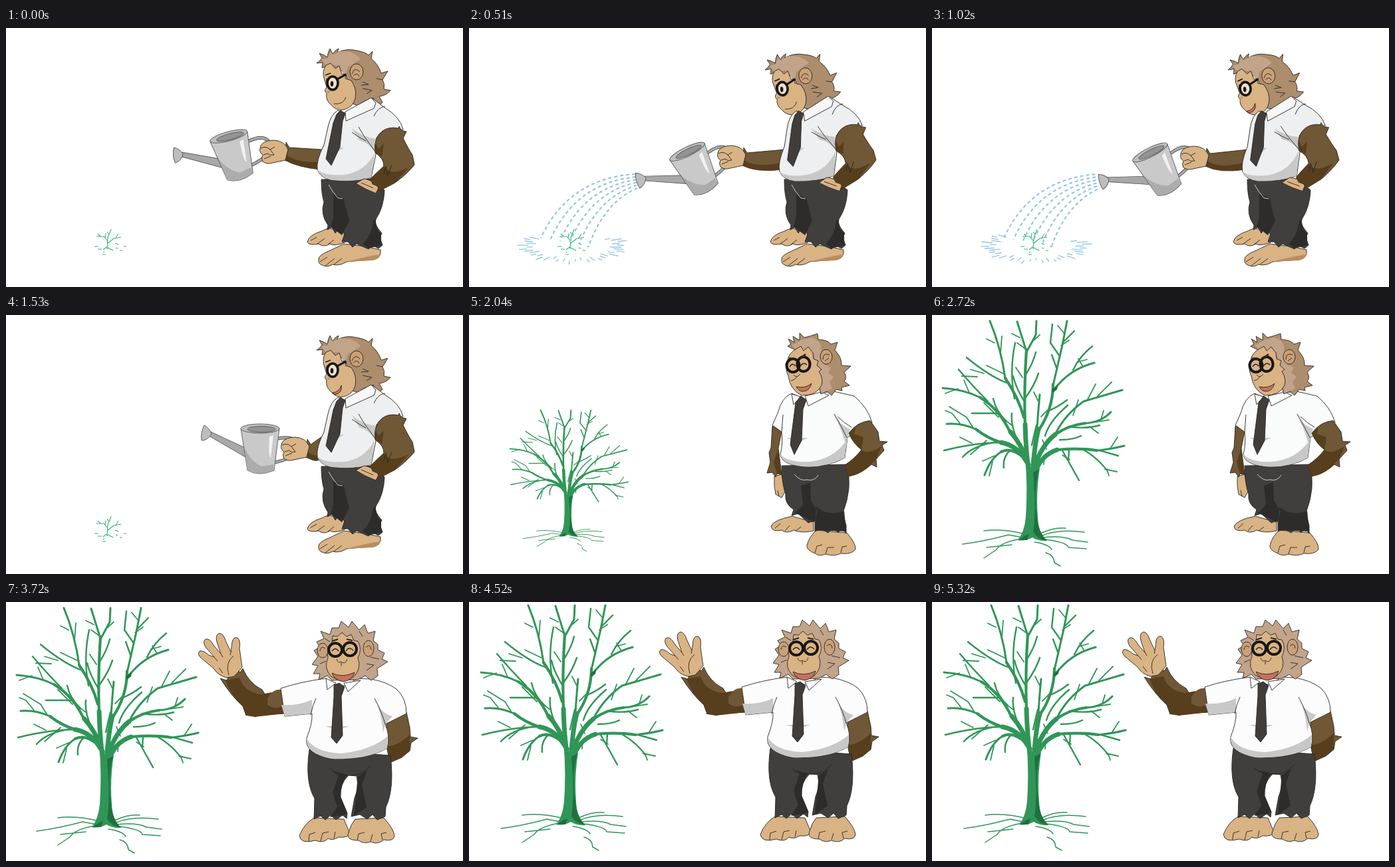
These frames come from a looping animation (687 px wide and 390 px high, 7120 ms). An HTML page:

```html
<!DOCTYPE html>
<html lang="en">
<head>
<meta charset="utf-8">
<title>Watering a tree</title>
<style>
html, body { margin: 0; width: 100%; height: 100%; overflow: hidden; background: #fff; }
svg { display: block; width: 100vw; height: 100vh; }
</style>
</head>
<body>
<svg id="stage" viewBox="0 0 687 390" preserveAspectRatio="none"></svg>
<script>
const LOOP = 7120;
const C = {
  ink: '#2a2623', skin: '#d9b384', skinDark: '#b98d5f', hair: '#ad8d6c', hairLight: '#c2a48a',
  fur: '#705735', furDark: '#573e1d', shade: '#c8c8c8', tie: '#403d3a', cloth: '#413f3d',
  clothDark: '#2e2c2b', lip: '#c8705c', tree: '#309657', treeDark: '#1f7040', water: '#93c6e4'
};

const fill = (d, color, more = '') => `<path d="${d}" fill="${color}" ${more}/>`;
const tone = (d, color) => fill(d, color, 'stroke="none"');
const line = (d, w = .9, color = C.ink) =>
  `<path d="${d}" fill="none" stroke="${color}" stroke-width="${w}"/>`;
const group = (body, transform = '', more = '') =>
  `<g ${transform && `transform="${transform}"`} ${more}>${body}</g>`;
const oval = (x, y, rx, ry, color, more = '') =>
  `<ellipse cx="${x}" cy="${y}" rx="${rx}" ry="${ry}" fill="${color}" ${more}/>`;
const lens = (x, y, rx, ry = rx, w = 4) =>
  oval(x, y, rx, ry, 'none', `stroke="#171614" stroke-width="${w}"`);

/* ---------- tree ---------- */
const BOUGHS = [
  [7, 'M146 240Q141 205 140 165M151 240Q154 195 160 172M145 225Q135 195 118 176M143 222Q128 196 104 192M154 240Q163 211 188 203M154 228Q165 196 185 180'],
  [4.2, 'M140 170Q138 110 142 52M160 174Q182 142 182 104M118 178Q102 142 72 124M138 154Q130 124 110 95M104 192Q84 186 66 172M188 203Q222 200 248 204M185 180Q205 166 230 163M142 218Q120 198 104 206'],
  [3, 'M142 55L128 10M142 56L156 30L157 9M182 106L196 45L203 9M72 124Q48 112 16 110M110 95Q104 50 87 9M66 172Q44 162 22 164M248 204Q270 202 289 197M230 163Q254 162 269 146M104 206Q88 216 79 241M184 112Q206 82 244 72M158 170Q160 140 162 120M186 178Q200 150 228 130L286 113'],
  [2.4, 'M104 192Q66 192 18 204M98 191Q62 196 46 214M118 203Q106 214 108 230M112 160Q96 145 92 126M128 188Q118 165 120 148M100 148Q84 148 60 148M84 130Q62 108 40 82M112 102Q86 92 52 64M124 126Q116 84 125 42M140 132Q126 110 122 92M141 124Q154 106 160 88M142 88Q152 72 156 56M192 62L178 42L181 14M188 82L180 60M212 83Q222 62 241 47M196 42L214 24M176 144Q190 138 203 128M170 182Q176 160 204 136M205 168Q232 172 252 166M192 188Q212 188 224 182M196 204Q205 220 221 249M206 203L205 218M226 202Q248 214 263 234M252 204L280 212M150 196Q154 178 157 166'],
  [1.8, 'M103 58L105 32M94 42L82 36M109 89L82 76M56 117L48 98M39 111L20 118M68 93L45 92M78 88L58 82M42 163L30 148L20 144M62 170L52 154L26 138M60 193L42 184M82 189L58 210M94 212L76 220M132 34L120 28M142 52L128 42M153 38L162 30M199 28L189 16M194 46L206 38M226 76L220 66M218 71L233 67M234 127L246 104M249 122L270 101M212 151L220 128M246 161L266 158M254 157L258 144M268 201L279 184M260 232L278 236M263 233L266 242M237 168L250 178M207 218L196 211M172 202L166 188M169 211L168 225M100 154L78 132M120 166L104 154M136 94L126 79M160 130L153 116M164 153L178 139M91 221L86 242'],
  [1.5, 'M140 330Q106 321 78 325M136 335L115 331Q78 341 46 345M140 336Q104 341 96 354L78 366M120 346L82 350M163 329Q184 319 201 321M166 332Q190 322 229 327M166 335Q198 332 211 339L234 342M170 338Q203 342 205 350L232 352M154 342Q175 345 180 353M171 358Q183 361 184 373L193 378']
];
const TREE = BOUGHS.map(([w, d]) => line(d, w, C.tree)).join('') +
  tone('M140 208Q144 260 141 304Q139 327 129 339Q140 341 151 335Q160 341 173 340Q160 329 159 304Q156 269 162 230L151 237Z', C.tree) +
  tone('M152 237L161 232Q152 263 158 305Q159 326 173 340Q158 338 152 326Q157 300 152 237M130 339Q140 331 146 330L143 339ZM180 112L189 105L188 112L182 117Z', C.treeDark);

const tree = (sx, sy, x = 152, y = 337) =>
  group(TREE, `translate(${x} ${y}) scale(${sx} ${sy}) translate(-152 -337)`, 'stroke-linecap="round"');
const SPROUT = line('M152 333L153 316L158 303M153 321L147 314L136 314M142 314L138 310M149 317L150 309M153 324L162 317L173 315M165 316L169 310M155 311L152 307M146 334L151 330L161 335M133 329H139M138 333H144M145 341H150M148 337L146 338M164 324L169 326M171 335H175M177 329H181M165 331L168 332', 1.1, '#32b572');

/* ---------- watering can ---------- */
function can([x, y, a]) {
  const handle = 'M27 -17Q52 -22 57 -7Q56 13 21 19';
  return group(
    line(handle, 5, '#555') + line(handle, 3, '#aaa') +
    fill('M-18 -1L-74 -27L-77 -21L-22 11Z', '#a8a8a8') +
    fill('M-84 -37Q-90 -25 -88 -14Q-79 -14 -73 -24Q-76 -33 -84 -37Z', '#bdbdbd') +
    fill('M-29 -32L-19 31Q-2 41 21 31L29 -32Z', '#c9c9c9') +
    tone('M-24 -5Q-16 16 2 25L20 22L20 31Q-2 40 -19 31Z', '#acacac') +
    tone('M14 -20L20 -22L16 12Q12 10 14 -20', '#f2f2f2') +
    oval(0, -32, 29, 7, '#bdbdbd') + oval(2, -31, 21, 4.5, '#949494'),
    `translate(${x} ${y}) rotate(${a})`, 'stroke="#5a5a5a"');
}

/* ---------- water ---------- */
const mix = (a, b, k) => a + (b - a) * k;
function water(phase, full) {
  let jets = '', ring = '';
  for (let i = 0; i < 6; i++) {
    const k = i / 5;
    jets += `M${mix(250, 253, k)} ${mix(220, 241, k)}Q${mix(150, 204, k)} ${mix(226, 262, k)} ${mix(108, 180, k)} ${mix(316, 328, k)}`;
  }
  for (let i = 0; i < 34; i++) {
    const a = -.55 + i / 33 * 4.25 + phase * .06;
    const r = .72 + (i * 7 % 5) * .045, end = r + .13 + (i * 3 % 4) * .03;
    const at = s => `${156 + 78 * s * Math.cos(a)} ${328 + 25 * s * Math.sin(a)}`;
    ring += `M${at(r)}L${at(end)}`;
  }
  const dashes = `<path d="${jets}" fill="none" stroke="${C.water}" stroke-width="2.2" stroke-dasharray="5 4" stroke-dashoffset="${-phase * 4.5}"/>`;
  return full ? dashes + line(ring, 1.4, C.water)
    : `<clipPath id="start"><path d="M185 200H270V290H185Z"/></clipPath>` + group(dashes, '', 'clip-path="url(#start)"');
}

/* ---------- side view ---------- */
const sideLegs =
  fill('M453 322Q455 312 474 306L485 301L509 308L509 323Q494 329 487 325Q478 331 470 325Q455 328 453 322Z', C.skin) +
  line('M458 320L467 315M468 325L479 317M484 326L493 319') +
  fill('M470 348Q470 342 485 336L508 325L540 329L563 334Q565 346 552 349Q530 350 512 352Q501 359 491 356Q483 361 475 357Q469 355 470 348Z', C.skin) +
  tone('M512 352Q540 344 563 341Q561 349 550 350Z', C.skinDark) +
  line('M472 352L483 345M480 358L494 347M493 356L505 347') +
  fill('M474 228Q474 250 478 262Q472 280 484 297L483 304L490 300L495 309L499 303L509 310L505 322L514 322L521 330L527 325L545 333L550 327L560 332L566 327L562 315L565 309Q553 296 556 288Q568 270 569 244L548 227Z', C.cloth) +
  tone('M492 250L492 285L488 299L505 312L516 290L507 256ZM536 325Q550 312 552 290L556 288Q554 300 564 310L564 327L545 332Z', C.clothDark) +
  line('M485 236L491 246L499 256L506 257', .9, '#ddd');

const sideHead = open =>
  fill('M481 58L475 60L476 52L467 53Q473 49 475 45L471 38Q480 41 483 44Q484 36 487 31L491 39Q495 33 500 31L498 37Q512 30 527 34Q540 36 545 41L551 35L549 46Q560 55 564 68L574 65L566 78Q570 84 568 92L578 94Q571 102 561 103L566 112L559 118Q555 114 552 105L549 109Q540 106 530 117L521 114L510 66Z', C.hair) +
  tone('M482 57L477 52L474 47L483 46L488 36L492 40L502 35Q524 34 533 47L514 59L509 74L501 57L488 55Z', C.hairLight) +
  fill('M481 56Q474 66 479 79L482 89Q477 95 482 98Q480 108 488 115Q496 125 508 123Q522 119 525 106Q528 92 519 79L510 76L511 69L505 70L501 57L495 61L488 53Z', C.skin) +
  oval(527, 66, 10, 12, '#c9a078') + line('M520 69Q524 58 532 66M522 72Q528 66 531 73') +
  line('M536 81L545 85L534 86M536 91L550 94L542 99M557 76L566 78') +
  oval(491, 83, 8, 10, '#eee0cf', 'stroke="#171614" stroke-width="3.6"') +
  oval(490, 84, 2.3, 4, '#171614', 'stroke="none"') +
  line('M498 77L511 70', 3, '#171614') + line('M483 76Q481 82 484 89', 2, '#171614') +
  line('M480 71L488 68', 1.8) +
  (open ? fill('M491 117Q501 116 504 106Q506 118 494 120Z', C.lip) : line('M493 114Q507 116 511 104')) +
  tone('M481 95Q484 96 488 94L485 98Z', C.skinDark);

const sideTorso =
  fill('M499 124Q488 130 484 149L478 176Q466 200 468 213Q472 226 490 229Q525 233 549 225L556 190L557 165Q575 148 597 153Q593 134 568 119L551 106Q530 118 510 128Z', '#eeeff0') +
  tone('M468 213Q478 223 508 221Q540 217 554 188L549 225Q525 232 490 229Q472 225 468 213M520 151Q535 164 556 167L555 188Q546 173 531 169M484 181L508 180L498 187Z', C.shade) +
  line('M530 149L539 164L555 186M520 157Q531 165 541 170M553 133Q559 119 570 118') +
  fill('M497 130L503 124L510 129L506 140L502 179L489 207L481 197L492 143Z', C.tie) +
  fill('M510 126L511 140L553 121L556 113L549 105Z', '#f7f7f7') +
  fill('M526 234L538 227Q549 228 561 239L556 249Q540 243 526 234Z', C.skin) + line('M534 233L552 241') +
  fill('M555 188Q552 165 566 155Q576 148 590 151L591 148L594 154L602 156L597 166Q606 184 611 191L614 206Q603 220 585 233L562 245L558 238L551 235L548 227Q557 218 568 208Q568 196 555 188Z', C.fur) +
  tone('M548 227Q557 218 568 208Q576 224 605 210L585 233L562 245L558 238L551 235ZM555 188L555 172L560 182L568 174L565 194Z', C.furDark) +
  line('M568 220L571 208L574 222L580 206');

const sideArm = ([x, y]) =>
  fill(`M482 170L475 183L${x + 24} ${y - 7}L${x + 19} ${y - 15}L${x + 17} ${y + 12}Q${x + 38} ${y + 23} 472 213Z`, C.fur) +
  tone(`M${x + 18} ${y + 3}Q${x + 38} ${y + 18} 474 201L472 213Q${x + 38} ${y + 23} ${x + 17} ${y + 12}Z`, C.furDark);

const fist = ([x, y]) => group(
  fill('M22 -4Q17 -17 1 -18Q-14 -18 -19 -10Q-23 0 -16 4Q-19 9 -16 14Q-10 19 -1 16L18 12Z', C.skin) +
  line('M-19 -6Q-12 -10 -5 -4L1 4Q-5 6 -9 2L-15 4M-14 10L-4 6M-5 -4L2 -8'),
  `translate(${x} ${y})`);

function side({ hand, pot, lean = 0, open = false, phase = -1, full = true }) {
  return (phase < 0 ? '' : water(phase, full)) + sideArm(hand) + can(pot) + fist(hand) + sideLegs +
    group(group(sideHead(open), `translate(${-10 * lean} ${6 * lean})`) + sideTorso, `rotate(${-4 * lean} 510 232)`);
}

/* ---------- three-quarter view ---------- */
const turnHead =
  fill('M489 52L479 47L484 44L480 36L489 41L487 32L497 38L497 27L504 34Q513 32 524 28L525 37Q539 37 544 44L554 41L550 53Q561 64 560 76L574 77L564 86Q569 94 564 100L572 106L560 109L561 114L552 112L545 121L538 115L529 119L510 55Z', C.hair) +
  tone('M490 51L485 45L491 43L498 38L514 34Q532 38 529 56L533 74L544 79L540 87L548 93L542 101L546 111L539 114L530 118L518 57Z', C.hairLight) +
  fill('M492 51Q478 59 479 72Q475 82 480 92Q483 113 500 121Q522 122 530 106Q533 96 526 85L530 82L523 76L525 69L518 66L517 57L510 48L503 54L499 47Z', C.skin) +
  oval(537, 63, 9, 11, '#c9a078') + line('M532 67Q532 56 542 60M535 69L541 65') +
  lens(487, 76, 9.5, 10) + lens(503, 74, 9.5, 11) +
  line('M482 78Q486 71 491 77M498 77Q503 70 508 75', 1.5) +
  line('M481 65L491 67M497 66L506 59', 2.7) + line('M488 90Q492 96 498 89M484 99Q490 98 493 93') +
  fill('M492 108Q506 111 515 103Q511 116 501 115Q495 114 492 108Z', C.lip);

const turn =
  fill('M459 243L470 240L475 266L470 275L461 270L459 257Z', C.skin) + line('M464 264L466 273') +
  fill('M456 167L470 175L465 201L470 240L463 239L461 244L456 237L448 238L453 222L451 207L454 200Z', C.fur) +
  tone('M465 201L470 240L463 239L458 221Z', C.furDark) +
  fill('M454 318Q459 308 486 303L518 312L518 325Q500 329 488 324Q478 330 470 324Q455 327 454 318Z', C.skin) +
  line('M460 321L468 314M475 325L482 317M491 325L499 319') +
  fill('M508 347Q511 334 522 324L568 328Q582 344 581 353Q575 361 559 359Q549 364 536 360Q527 364 520 359Q507 354 508 347Z', C.skin) +
  line('M520 358L523 348L531 346M536 360L539 350L549 350M559 358L561 349L568 348') +
  fill('M470 227Q470 253 476 270Q474 284 488 293L485 302L495 299L510 313L520 309L520 326L529 322L540 328L548 320L555 328L560 321L567 329L567 317L562 298Q577 260 568 225Z', C.cloth) +
  tone('M499 257L502 286L490 298L519 312L524 296L514 279L513 252ZM522 288Q538 304 564 295L567 326L520 324Z', C.clothDark) +
  line('M489 240Q499 251 508 248Q519 251 525 241', .9, '#ddd') +
  fill('M485 118Q470 124 464 148L456 166L470 176Q472 195 468 210Q470 225 500 228Q540 230 565 215L569 184L606 162Q600 140 579 122L548 115L530 117L508 128Z', '#fafbfb') +
  tone('M468 210Q480 222 510 221Q548 218 568 188L565 215Q535 231 500 228Q470 224 468 210M547 148Q558 166 573 172L569 184L567 200Q561 171 547 148M477 185L510 185L494 192Z', C.shade) +
  line('M470 176L472 150M549 149Q561 170 568 185M554 153Q564 163 575 169') +
  fill('M492 124L499 122L507 128L502 142L500 189L489 210L483 195L490 140Z', C.tie) +
  fill('M485 119L488 135L498 123ZM505 122L510 137L541 121L530 116Z', '#fff') +
  fill('M571 178Q583 161 603 159L615 176L617 190L629 191L621 196L624 204L612 217L613 229L605 225L599 230Q585 241 570 243L565 226Q580 216 590 203Q577 193 571 178Z', C.fur) +
  tone('M565 226Q580 216 590 203Q599 211 620 198L612 217L599 230Q585 241 570 243ZM571 178L581 169L579 179L593 184L590 203Q577 193 571 178Z', C.furDark) +
  turnHead;

/* ---------- front view ---------- */
const frontHead =
  fill('M484 47L470 42L475 53L464 58L469 66L460 71L466 80L457 92L466 94L459 106L469 106L467 115L480 109L487 116L526 115L537 109L546 116L556 109L555 98L571 88L562 84L566 75L556 70L556 62L549 56L552 42L541 45L536 32L528 40L517 27L512 36L501 27L497 37L487 37Z', C.hairLight) +
  line('M476 53L484 58M469 91L478 87M539 91L550 93L539 101M545 81L558 84M528 42L533 50') +
  oval(473, 71, 8, 11, '#c9a078') + oval(542, 68, 8, 12, '#c9a078') +
  line('M469 72Q470 63 477 68M538 66Q545 60 546 70') +
  fill('M502 44L495 50L488 49L487 59Q478 70 481 82Q474 98 486 110Q502 121 519 111Q532 99 526 82Q533 69 526 57L520 56L516 47L509 50Z', C.skin) +
  lens(492, 70, 10) + lens(514, 69, 10) +
  line('M487 72Q492 65 497 72M508 72Q513 64 519 71', 1.4) + line('M487 57L496 54M509 54L518 56', 2.3) +
  line('M494 84Q496 91 501 88Q507 93 510 84M501 89V94') +
  fill('M487 105Q503 113 521 104Q518 116 504 118Q491 116 487 105Z', C.lip);

const frontHand =
  fill('M412 130L387 138L382 130Q362 120 353 98L349 104L343 98L340 108L332 108L329 116L319 113Q336 140 353 155L358 169L363 164L371 171L377 168L416 166Z', C.fur) +
  tone('M327 116L348 112Q355 134 381 137L396 134L392 152L416 156L416 166L371 171L358 169L353 155Q335 139 327 116Z', C.furDark) +
  tone('M390 143Q398 128 412 130L416 154Q402 161 390 153Z', C.fur) +
  fill('M329 112Q316 109 309 98L290 82Q284 76 288 72Q293 70 302 78L310 81L297 66Q292 57 297 54Q303 52 309 63L320 76L314 58Q311 47 318 45Q324 46 327 56L335 73L337 58Q339 50 345 52Q350 56 348 68L352 96Q345 105 340 110Z', C.skin) +
  line('M310 81L315 87M320 76L323 81M335 73L334 78M332 108Q326 89 339 79M317 97L323 105');

const front = wave =>
  fill('M569 180L599 164L604 187L605 201L616 203L606 210L604 222L592 232L574 240L569 215Z', C.fur) +
  tone('M569 215Q584 216 604 198L604 222L592 232L574 240Z', C.furDark) +
  fill('M438 350Q445 332 460 323L505 325L513 344Q514 354 497 352Q488 358 481 354Q475 362 462 357Q440 363 438 350Z', C.skin) +
  fill('M512 345Q515 333 522 325L565 323Q580 340 581 350Q580 359 565 356Q556 364 545 359Q535 363 527 357Q507 357 512 345Z', C.skin) +
  line('M452 358L453 348L462 345M470 358L473 346L482 344M490 354L492 344M525 357L527 347L536 345M545 358L548 348M563 356L561 347L569 345') +
  fill('M453 220Q446 269 461 294L460 325L470 320L477 326L485 319L493 326L503 319L509 324L510 316L500 292Q498 272 512 259L524 260Q528 277 521 293L516 321L529 318L540 325L548 318L555 326L567 321L568 307Q581 280 575 229Z', C.cloth) +
  tone('M486 252L497 258L488 285L495 306L484 322L503 319L510 316L500 292Q500 272 510 258ZM526 261L540 251L532 274L539 307L520 320L523 292Z', C.clothDark) +
  line('M484 249Q496 262 512 259Q530 261 545 245') +
  group(frontHand, `rotate(${wave} 398 150)`) +
  fill('M478 113Q440 118 410 128L416 170L457 166Q458 180 449 203Q445 226 486 234Q540 236 570 218Q575 200 567 182L599 166Q599 144 585 130Q570 118 545 114L525 113L510 124L493 124Z', '#fcfcfc') +
  tone('M449 203Q460 224 500 226Q545 222 571 200L570 218Q540 236 486 234Q447 226 449 203M411 153Q435 155 457 145L457 166L416 170ZM552 143Q559 166 578 170L567 182L564 195Q562 168 552 143M477 185H513L496 191Z', C.shade) +
  line('M455 168Q458 153 463 143M551 143Q563 166 567 182') +
  frontHead +
  fill('M490 123L498 120L506 126L501 140L503 199L494 211L486 202L490 140Z', C.tie) +
  fill('M478 113L480 130L493 120ZM505 120L511 133L530 116Z', '#fff');

/* ---------- timeline ---------- */
const pour = (phase, bob = 0) => SPROUT + side({
  hand: [394, 195 + bob], pot: [342, 215 + bob, -26 - bob / 2], lean: 1, phase, open: phase % 2 === 1 });
const ready = lean => ({ hand: [394, 195], pot: [342, 215, -26], lean, phase: 0, full: false });
const steps = [
  [0, () => SPROUT + side({ hand: [402, 187], pot: [343, 194, -15] })],
  [170, () => SPROUT + side({ hand: [398, 191], pot: [342, 205, -20], lean: .85 })],
  [340, () => SPROUT + side(ready(.85))],
  ...[0, 1, 2, 3, 4].map(i => [510 + 170 * i, () => pour(i, i % 2)]),
  [1360, () => SPROUT + side(ready(.85))],
  [1530, () => SPROUT + side({ hand: [434, 202], pot: [382, 203, 0], open: true })],
  [1700, () => tree(.24, .2, 151, 333) + side({ hand: [440, 210], pot: [388, 211, 0], open: true })],
  [1870, () => tree(.44, .38, 150, 332) + sideLegs + turnHead + sideTorso],
  [2040, () => tree(.65, .575, 150, 332) + turn],
  [2210, () => tree(.67, .62, 151, 333) + turn],
  [2380, () => tree(.79, .72, 151, 334) + turn],
  [2550, () => tree(.87, .82, 152, 335) + turn],
  [2720, () => tree(1, 1) + turn],
  [3720, () => tree(1, 1) + group(front(0), 'translate(3 2)')],
  [4120, () => tree(1, 1) + group(front(10), 'translate(3 2)')],
  [4520, () => tree(1, 1, 154, 333) + front(0)],
  [4920, () => tree(1, 1, 154, 333) + front(10)],
  [5320, () => tree(1, 1, 154, 333) + front(0)]
];

const stage = document.getElementById('stage');
const began = performance.now();
let shown = -1;
function tick() {
  const t = (performance.now() - began) % LOOP;
  const now = steps.findLastIndex(s => s[0] <= t);
  if (now !== shown) {
    shown = now;
    stage.innerHTML = group(steps[now][1](), '', `stroke="${C.ink}" stroke-width=".9" stroke-linejoin="round"`);
  }
  requestAnimationFrame(tick);
}
tick();
</script>
</body>
</html>
```
